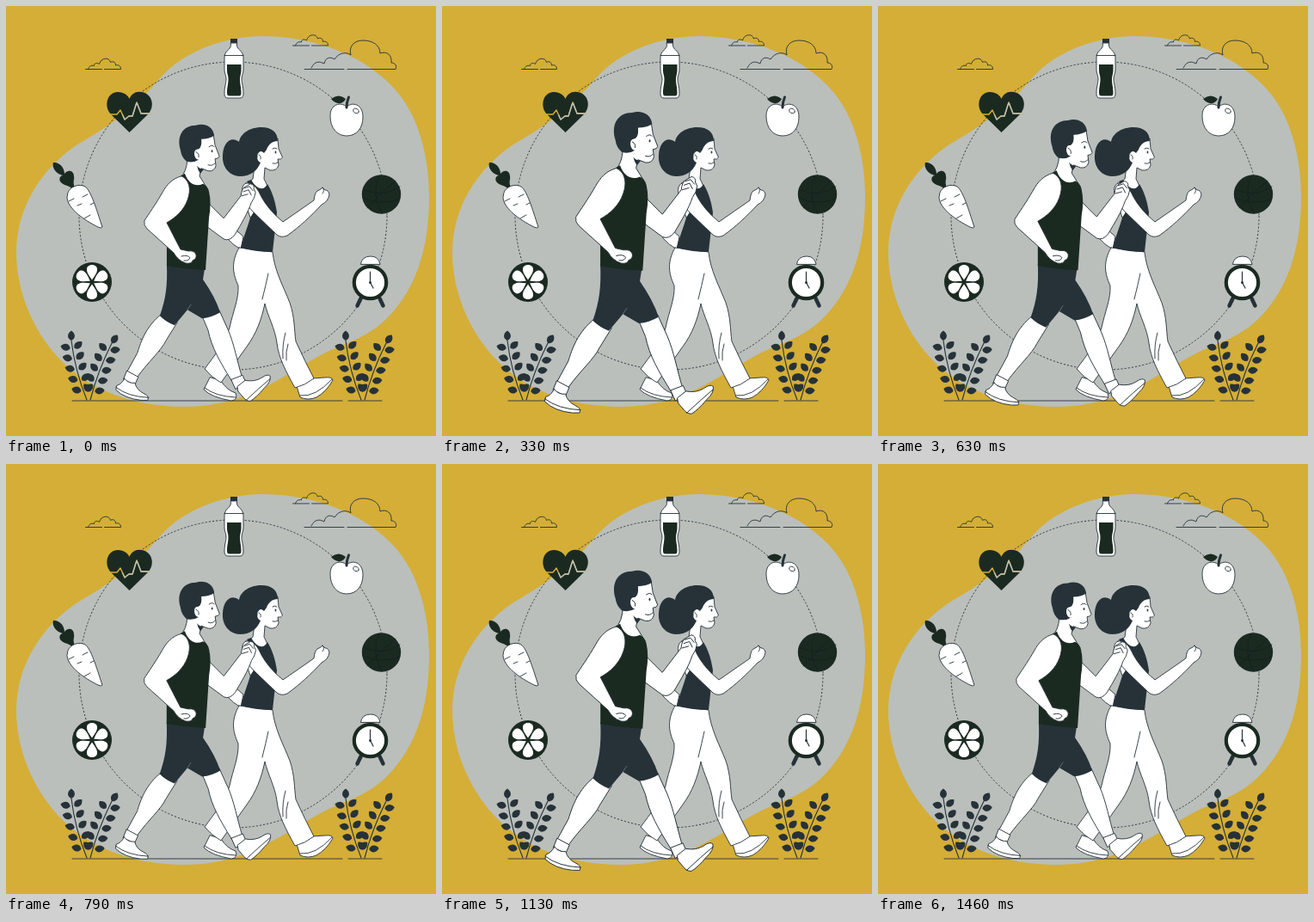
An HTML page with a canvas that plays this animation: 500 px wide and 500 px high, repeating every 1.5 s.

```html
<!DOCTYPE html>
<html lang="en">
<head>
<meta charset="utf-8">
<title>Walking couple</title>
<style>
html, body { margin: 0; width: 100%; height: 100%; overflow: hidden; background: #d4ae36; }
canvas { display: block; width: 100vmin; height: 100vmin; }
</style>
</head>
<body>
<canvas id="stage" width="500" height="500"></canvas>
<script>
const ctx = document.getElementById('stage').getContext('2d');
const YELLOW = '#d4ae36', GREY = '#babfbc', GREEN = '#1b2a21', NAVY = '#263238', WHITE = '#fff';
const BLOB = 'M300 35C360 36 420 58 455 100C480 130 492 175 492 222C492 285 475 333 440 366C415 389 390 392 362 408C320 431 278 466 208 466C150 466 95 447 60 408C30 375 12 330 12 287C12 235 40 190 83 161C125 137 152 116 179 84C207 52 255 35 300 35Z';
const LOOP = 1500;
const BEAT = [[0, 1.002], [300, 1.1], [830, 1], [1165, 1.1], [1470, 1], [1500, 1.002]];

function shape(d, fill, stroke = NAVY, width = 0.9) {
  const path = new Path2D(d);
  if (fill) { ctx.fillStyle = fill; ctx.fill(path); }
  if (stroke) { ctx.strokeStyle = stroke; ctx.lineWidth = width; ctx.stroke(path); }
}
const line = (d, color = NAVY, width = 0.9) => shape(d, null, color, width);
const solid = (d, color) => shape(d, color, null);

function oval(x, y, rx, ry, fill, stroke, angle = 0, width = 0.9) {
  ctx.beginPath();
  ctx.ellipse(x, y, rx, ry, angle, 0, Math.PI * 2);
  if (fill) { ctx.fillStyle = fill; ctx.fill(); }
  if (stroke) { ctx.strokeStyle = stroke; ctx.lineWidth = width; ctx.stroke(); }
}

function at(x, y, draw, angle = 0) {
  ctx.save();
  ctx.translate(x, y);
  ctx.rotate(angle);
  draw();
  ctx.restore();
}

function backdrop() {
  ctx.fillStyle = YELLOW;
  ctx.fillRect(0, 0, 500, 500);
  solid(BLOB, GREY);
  ctx.save();
  ctx.lineCap = 'butt';
  ctx.setLineDash([2.2, 2]);
  oval(264, 244, 179, 179, null, NAVY);
  ctx.restore();
  line('M77 459H391M398 459H437');
}

function smallCloud() {
  line('M0 13H19M22 13H41C41 9 38 7.500 35 8.500C35 4 31 3.500 29 5C28-1 18-1 16 7C13 5 10 6 10 9C6 8 4 10 3 13');
}

function clouds() {
  at(92.5, 60.5, smallCloud);
  at(333.500, 33, smallCloud);
  line('M347 73.500H393M397 73.500H453C455 69 452 66 448 66C449 57 443 52 435 55C435 46 427 40 415 40C405 40 398 47 401 57C396 53 387 54 382 62C376 58 371 61 370 67C364 64 359 64 355 72');
}

function bottle() {
  solid('M261 38H269V43H261Z', NAVY);
  shape('M261.500 43H268.500V46C269 51 276 52 276 60V74C276 79 274 80 274 85C274 90 276 93 276 102Q276 107 272 107H258Q254 107 254 102C254 93 256 90 256 85C256 80 254 79 254 74V60C254 52 261 51 261.500 46Z', WHITE);
  line('M254 57.500H276');
  solid('M257 68H273.500V75C273.500 79 272 81 272 85C272 91 273.500 94 273.500 101Q273.500 104.500 271 104.500H259.500Q257 104.500 257 101C257 94 258.500 91 258.500 85C258.500 81 257 79 257 75Z', GREEN);
}

function apple() {
  shape('M396 117C389 111 377 114 377 128C377 142 385 151 396 151C408 151 415 142 415 129C415 114 403 111 396 117Z', WHITE);
  line('M396 118Q396 112 398.500 106', NAVY, 3);
  solid('M378 108Q387 101 395 108Q392 114 386 113Q381 112 378 108Z', GREEN);
  oval(407, 122, 3.5, 2.6, WHITE, NAVY, 0.5);
}

function ball() {
  oval(436.5, 219, 22.7, 22.7, GREEN);
  line('M415 213Q438 224 458 210M420 235Q434 219 453 203M434 197Q424 218 437 241M415 223Q436 233 458 224', '#131f19', 0.7);
}

function clock() {
  line('M412.500 340L408.500 348.500M434.500 340L438.500 348.500', NAVY, 4.5);
  shape('M412.500 300Q414 291 424 291Q433 291 435 300Z', WHITE);
  oval(423.5, 321.5, 18.7, 18.7, WHITE, GREEN, 0, 4.2);
  line('M423.500 309V321.500L427 328', NAVY, 1.2);
  oval(423.5, 321.5, 1.5, 1.5, NAVY);
}

function citrus() {
  oval(100, 321, 23, 23, GREEN);
  for (let i = 0; i < 6; i++) {
    at(100, 321, () => solid('M0 -2.500C-3 -7-6.500 -11-6 -15.500C-5.500 -21.500 5.500 -21.500 6 -15.500C6.500 -11 3 -7 0 -2.500Z', WHITE), i * Math.PI / 3);
  }
}

function carrot() {
  solid('M78 213C73 208 66 209 63 204C61 200 64 197 66 197C58 195 53 188 55 182C62 181 68 188 68 195C73 189 79 192 79 198C80 202 77 204 80 211Z', GREEN);
  shape('M72 217C74 210 85 206 92 210C99 215 105 236 112 257Q111 259 107 257C91 249 72 236 71 223Z', WHITE);
  line('M73 227L79 224M89 222L95 219M83 232L88 230M91 247L98 243M98 231L102 229');
}

// The pulse trace is a cut through the heart, so it takes the colour behind it.
function heart() {
  const pulse = 'M118 126H129L133 121L138 132L143 128L147 128L152 112L157 125H168';
  solid('M143.500 147L122 126C113 116 118 100 130 100C137 100 142 104 143.500 108C146 102 151 99 157 100C169 101 174 115 166 125Z', GREEN);
  line(pulse, YELLOW, 1.4);
  ctx.save();
  ctx.clip(new Path2D(BLOB));
  line(pulse, GREY, 1.4);
  ctx.restore();
}

// Leaves sit in pairs along a stem that leans from its foot to its tip.
function sprig(x0, y0, x1, y1, bend) {
  const mx = (x0 + x1) / 2 + bend, my = (y0 + y1) / 2;
  line(`M${x0} ${y0}Q${mx} ${my} ${x1} ${y1}`, NAVY, 1.1);
  const leaf = 'M0 0C-5 -2-5.500 -8 0 -11.500C5.500 -8 5 -2 0 0Z';
  const lean = Math.atan2(x1 - x0, y0 - y1);
  at(x1, y1, () => solid(leaf, NAVY), lean + 0.25);
  for (let i = 0; i < 5; i++) {
    const t = 0.15 + i * 0.18, u = 1 - t;
    const x = u * u * x0 + 2 * u * t * mx + t * t * x1;
    const y = u * u * y0 + 2 * u * t * my + t * t * y1;
    for (const side of [-1, 1]) {
      at(x + side * 2.5, y, () => solid(leaf, NAVY), lean + side * 1.1);
    }
  }
}

function plant() {
  sprig(94, 458, 76, 389, -5);
  sprig(98, 458, 123, 392, -4);
}

function woman() {
  // Far arm, shoes and trousers
  shape('M262 256L276 268L273 283Q264 278 257 270Z', WHITE);
  shape('M237 432L230 446Q239 455 262 459Q270 458 267 450Q257 447 250 436Z', WHITE);
  shape('M338 442L342 455Q351 459 361 455Q373 448 380 435Q379 431 371 432L356 433Z', WHITE);
  line('M231 444Q244 454 267 455M342 453Q360 455 379 434');
  shape('M271 281L310 286C312 307 322 325 330 345C336 363 335 376 337 390Q348 414 358 433Q348 441 336 444C325 424 317 409 315 392C313 375 304 360 301 346C297 365 291 381 280 396L250 438Q239 432 231 422C242 407 255 391 260 374C264 355 271 340 270 325C263 310 262 297 271 281Z', WHITE);
  line('M305 311Q302 325 298 341M325 380Q321 394 322 410M328 393Q325 402 326 412');

  // Head, neck and top
  shape('M298 158L316 154L317 166L321.500 176Q320 179 316 178L317 185Q315 192 307 191L301 188L300 201Q304 208 308 222L304 235L284 246L276 222Q277 208 287 201L289 187Z', WHITE);
  solid('M280 204L285 202C290 211 299 217 304 207C309 215 313 226 315 240L310 286Q289 286 273 281C277 266 281 257 284 246L289 238C288 224 286 213 280 204Z', NAVY);

  // Near arm
  shape('M279 206C288 205 293 213 297 222Q305 237 322 251L358 226Q359 217 362 215Q367 213 368 211L371 214Q375 214 376 219Q375 227 367 231C355 244 341 257 327 267Q320 270 315 266L289 241C278 230 273 220 275 211Q276 207 279 206Z', WHITE);
  line('M368 211Q371 215 368 218');

  // Hair and face
  solid('M271 158C273 147 285 141 297 141C309 141 316 147 316 157C310 157 305 161 303 167L300 171Q296 167 293 171C291 176 292 180 296 182C292 192 284 198 272 198C258 197 251 186 252 173C253 158 262 151 271 158Z', NAVY);
  oval(295.5, 175, 3, 5, WHITE, null);
  oval(313.5, 170, 0.9, 1.5, NAVY);
  line('M310 166Q313 164 315 166M310 183Q314 184 316 182M294 173Q297 174 296 178');
}

function man() {
  // Far arm
  shape('M235 229L253 247L273 221Q274 213 277 211L284 207Q289 208 288 213L290 217Q289 224 285 229C281 241 273 254 266 266Q260 274 253 271L234 257Z', WHITE);
  line('M277 212L283 210L287 215M276 216L282 214L285 220M274 221L281 219');

  // Rear leg
  shape('M181 358C163 372 157 390 153 403L141 425L153 431C165 414 181 400 186 389L199 368Z', WHITE);
  shape('M141 424L154 431L150 440L137 434Z', WHITE);
  shape('M138 433Q134 440 129 441L128 446Q138 456 157 458L165 458Q167 453 160 450Q152 446 150 438Q143 439 138 433Z', WHITE);
  line('M128 443Q142 454 166 455');

  // Front leg
  shape('M227 358L235 377C239 397 249 414 262 435L274 430C269 414 265 392 258 376L248 354Z', WHITE);
  shape('M262 434L275 429L279 438L267 445Z', WHITE);
  shape('M269 442L278 435Q289 437 297 432Q304 427 307 430Q308 437 300 444Q291 455 284 459Q279 459 276 455L270 448Z', WHITE);
  line('M279 458Q294 444 307 433');

  // Shorts, head and vest
  solid('M187 300L231 305L229 318Q243 338 249 356Q239 362 228 363L211 353L196 371Q186 367 179 360C186 340 188 325 187 300Z', NAVY);
  line('M211 353L215 347', GREY, 0.4);
  shape('M213 160L241 149L243 162L248 175Q247 178 243 178L244 186Q242 193 235 192L227 189L225 198L235 214L214 226L203 199Q210 194 211 178Z', WHITE);
  solid('M222 186Q225 190 230 190L226 195Q223 191 222 186Z', NAVY);
  solid('M203 198L208 195C212 207 221 211 229 207Q234 209 236 216Q239 229 236 246L232 307Q208 306 187 302L187 250L208 227Q213 207 203 198Z', GREEN);

  // Near arm
  shape('M204 198C193 201 187 208 182 217C174 231 166 242 161 250Q160 255 164 259L195 287Q200 296 209 299Q216 300 217 296Q222 294 221 289Q219 284 212 285L203 283L187 252C198 246 207 237 211 226C216 213 213 202 204 198Z', WHITE);
  line('M204 291Q212 289 214 293Q212 297 207 296');

  // Hair and face
  solid('M203 168C198 151 206 139 221 139C230 136 241 140 242 151Q236 155 227 155C228 162 226 166 223 167Q219 167 219 172Q220 179 224 179Q218 183 210 181Q204 176 203 168Z', NAVY);
  oval(223, 172.5, 3.7, 5.6, WHITE, null);
  line('M221 170Q225 172 224 176M236 164Q240 161 242 164M235 185Q240 187 243 183');
  oval(239.5, 169, 0.9, 1.5, NAVY);
}

function beatAt(t) {
  const i = BEAT.findIndex(([time]) => time > t);
  const [t0, s0] = BEAT[i - 1], [t1, s1] = BEAT[i];
  return s0 + (s1 - s0) * (t - t0) / (t1 - t0);
}

function frame() {
  const scale = beatAt(performance.now() % LOOP);
  backdrop();
  clouds();
  [bottle, apple, ball, clock, citrus, carrot, heart].forEach(draw => draw());
  plant();
  at(319, 0, plant);
  woman();
  ctx.save();
  ctx.translate(218, 298);
  ctx.scale(scale, scale);
  ctx.translate(-218, -298);
  man();
  ctx.restore();
  requestAnimationFrame(frame);
}

ctx.lineJoin = ctx.lineCap = 'round';
frame();
</script>
</body>
</html>
```
